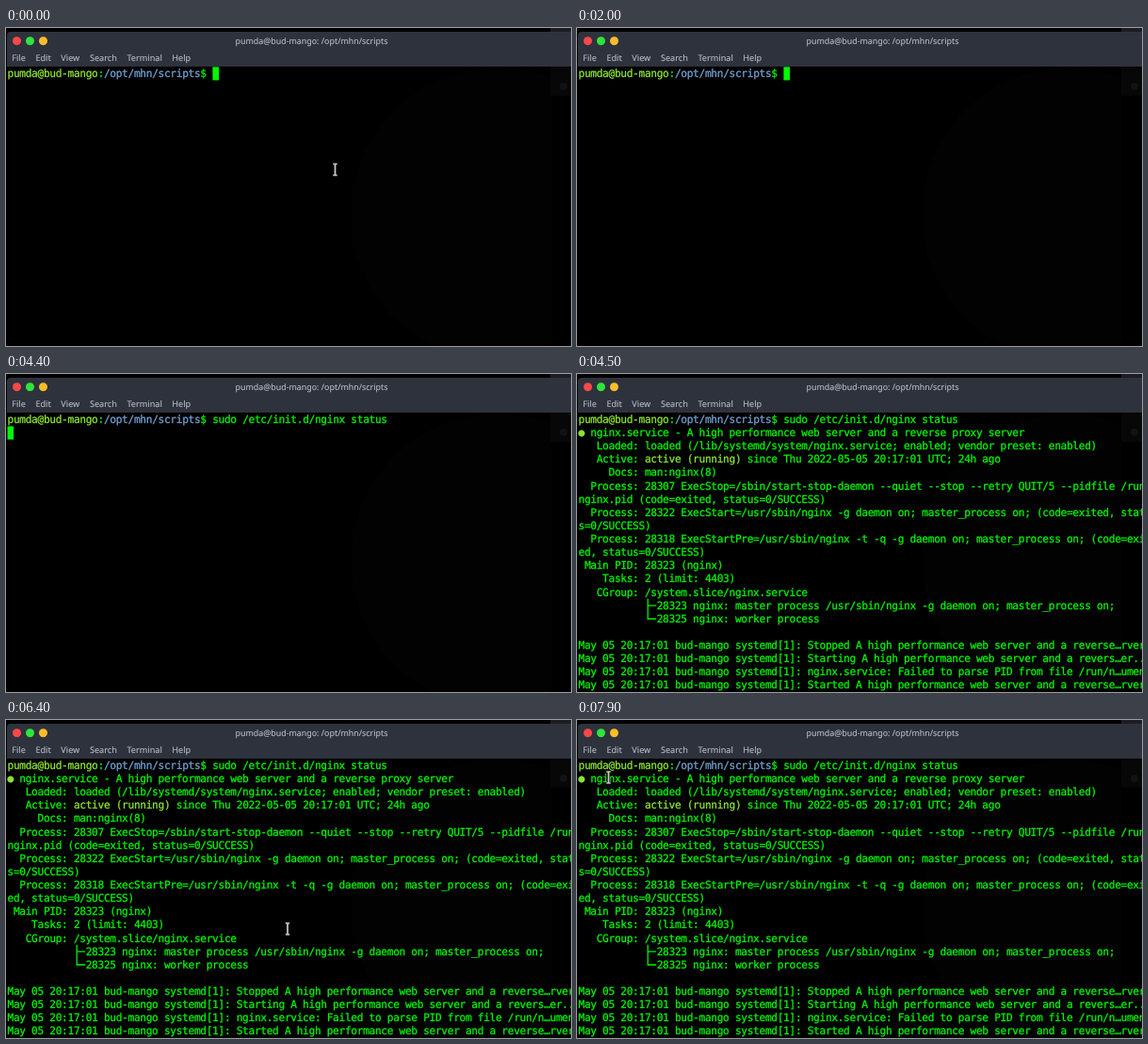
These frames come from a looping animation (600x338 px, 8 s). An HTML page:

```html
<!DOCTYPE html>
<html lang="en">
<head>
<meta charset="utf-8">
<title>Terminal</title>
<style>
  html, body { margin: 0; width: 100%; height: 100%; overflow: hidden; background: #000; }
  svg { display: block; width: 600px; height: 338px; }
  text { white-space: pre; text-rendering: geometricPrecision; }
  .ui { font: 9.15px "Noto Sans", "Open Sans", sans-serif; fill: #b4b9c2; stroke: #b4b9c2; stroke-width: .12; }
  .title { font-size: 8.9px; text-anchor: middle; }
  .term { font: 11.2px "DejaVu Sans Mono", monospace; letter-spacing: -.335px; stroke-width: .3; }
  .term, .term tspan { fill: var(--ink); stroke: var(--ink); }
  .term { --ink: #00f400; }
  .term .user { --ink: #8ae234; }
  .term .path { --ink: #729fcf; }
</style>
</head>
<body>
<svg viewBox="0 0 600 338">
  <rect width="600" height="338"/>
  <circle cx="522" cy="198" r="156" fill="#010201"/>
  <rect x="578" width="22" height="338"/>
  <rect x="578" width="22" height="5" fill="#1b1d22"/>
  <rect x="578" y="40" width="22" height="32" fill="#070707"/>
  <circle cx="592" cy="62" r="4" fill="#121212"/>
  <path d="M1 41V8q0-4 4-4H600V41z" fill="#2e323c"/>
  <g id="buttons"></g>
  <text class="ui title" x="324.5" y="17.1">pumda@bud-mango: /opt/mhn/scripts</text>
  <text id="menu" class="ui" x="6.2" y="35.2"></text>
  <g class="term">
    <text x="1.5" y="52"><tspan class="user">pumda@bud-mango</tspan>:<tspan class="path">/opt/mhn/scripts</tspan>$ <tspan id="command"></tspan></text>
    <g id="output"></g>
  </g>
  <rect id="caret" width="6.6" height="14.1" fill="#00f800"/>
  <g id="pointer" fill="none">
    <path d="M-2.2-6H2.2M0-6V6M-2.2 6H2.2" stroke="#111" stroke-width="3"/>
    <path d="M-2.2-6H2.2M0-6V6M-2.2 6H2.2" stroke="#c8c8c8" stroke-width="1.7"/>
  </g>
</svg>
<script>
const $ = id => document.getElementById(id);
const LOOP = 8000, STEP = 100;
const LEFT = 1.5, TOP = 41.4, CELL = 6.41, ROW = 14.12, PROMPT = 34;
const RECALL = 2200, RECALL_NEXT = 3600, ENTER = 4300, OUTPUT = 4500;
const POINTER_HIDE = 2000, POINTER_SHOW = 5400;
const BLINK = 600;

const host = "bud-mango", server = "A high performance web server and a ";
const daemon = "/usr/sbin/nginx ", forks = "-g daemon on; master_process on;";
const log = `May 05 20:17:01 ${host} systemd[1]: `;
const lines = [
  `{●} nginx.service - ${server}reverse proxy server`,
  "   Loaded: loaded (/lib/systemd/system/nginx.service; enabled; vendor preset: enabled)",
  "   Active: {active (running)} since Thu 2022-05-05 20:17:01 UTC; 24h ago",
  "     Docs: man:nginx(8)",
  "  Process: 28307 ExecStop=/sbin/start-stop-daemon --quiet --stop --retry QUIT/5 --pidfile /run/",
  "nginx.pid (code=exited, status=0/SUCCESS)",
  `  Process: 28322 ExecStart=${daemon}${forks} (code=exited, statu`,
  "s=0/SUCCESS)",
  `  Process: 28318 ExecStartPre=${daemon}-t -q ${forks} (code=exit`,
  "ed, status=0/SUCCESS)",
  " Main PID: 28323 (nginx)",
  "    Tasks: 2 (limit: 4403)",
  "   CGroup: /system.slice/nginx.service",
  `             28323 nginx: master process ${daemon}${forks}`,
  "             28325 nginx: worker process",
  "",
  `${log}Stopped ${server}reverse…rver.`,
  `${log}Starting ${server}revers…er...`,
  `${log}nginx.service: Failed to parse PID from file /run/n…ument`,
  `${log}Started ${server}reverse…rver.`
];

// Box-drawing branch joining two neighbouring rows
function branch(col, row) {
  const x = LEFT + (col + .5) * CELL, y = TOP + row * ROW, dash = `h${CELL * 1.4}`;
  return `<path d="M${x} ${y}v${ROW * 1.5}${dash}M${x} ${y + ROW / 2}${dash}" fill="none" stroke="#00f400" stroke-width="1.3"/>`;
}

$("buttons").innerHTML = ["#f9484a", "#2fe43c", "#fbbd2c"]
  .map((fill, i) => `<circle cx="${11.5 + 14 * i}" cy="13.8" r="4.5" fill="${fill}"/>`).join("");
$("menu").innerHTML = ["File", "Edit", "View", "Search", "Terminal", "Help"]
  .map((name, i) => `<tspan dx="${i ? 10.6 : 0}">${name}</tspan>`).join("");
$("output").innerHTML = lines.map((line, i) => {
  const body = line.replace("{", '<tspan class="user">').replace("}", "</tspan>");
  return `<text x="${LEFT}" y="${52 + ROW * (i + 1)}">${body}</text>`;
}).join("") + branch(11, 14);

// Pointer glides: start time, duration, destination
const glides = [
  { at: 0, ms: 200, x: 416, y: 130 },
  { at: 5000, ms: 100, x: 380, y: 113 },
  { at: 5500, ms: 200, x: 370.5, y: 87 },
  { at: 5800, ms: 100, x: 298, y: 57 },
  { at: 5900, ms: 200, x: 219, y: 297 },
  { at: 6200, ms: 200, x: 299, y: 222 },
  { at: 6500, ms: 500, x: 95.5, y: 76 },
  { at: 7000, ms: 400, x: 33.5, y: 61 }
];

const clamp = v => Math.min(1, Math.max(0, v));

function pointerAt(t) {
  let x = 349.5, y = 150.5;
  for (const g of glides) {
    const k = clamp((t - g.at) / g.ms);
    x += (g.x - x) * k;
    y += (g.y - y) * k;
  }
  return [x, y];
}

function commandAt(t) {
  if (t < RECALL) return "";
  return t < RECALL_NEXT ? "clear" : "sudo /etc/init.d/nginx status";
}

function caretAlpha(t) {
  if (t >= OUTPUT) return 0;
  if (t < RECALL || t >= ENTER) return 1;
  const phase = (t - RECALL) % (2 * BLINK);
  return clamp(1 - (phase - BLINK + STEP) / (2 * STEP));
}

function draw(now) {
  const t = Math.floor(now % LOOP / STEP) * STEP;
  const text = commandAt(t);
  const entered = t >= ENTER;
  $("command").textContent = text;
  $("output").style.display = t >= OUTPUT ? "" : "none";
  $("caret").setAttribute("x", LEFT + (entered ? 0 : (PROMPT + text.length) * CELL));
  $("caret").setAttribute("y", TOP + (entered ? ROW : 0));
  $("caret").setAttribute("opacity", caretAlpha(t));
  $("pointer").style.display = t < POINTER_HIDE || t >= POINTER_SHOW ? "" : "none";
  $("pointer").setAttribute("transform", `translate(${pointerAt(t)})`);
}

const start = performance.now();
function tick() {
  draw(performance.now() - start);
  requestAnimationFrame(tick);
}
tick();
</script>
</body>
</html>
```
